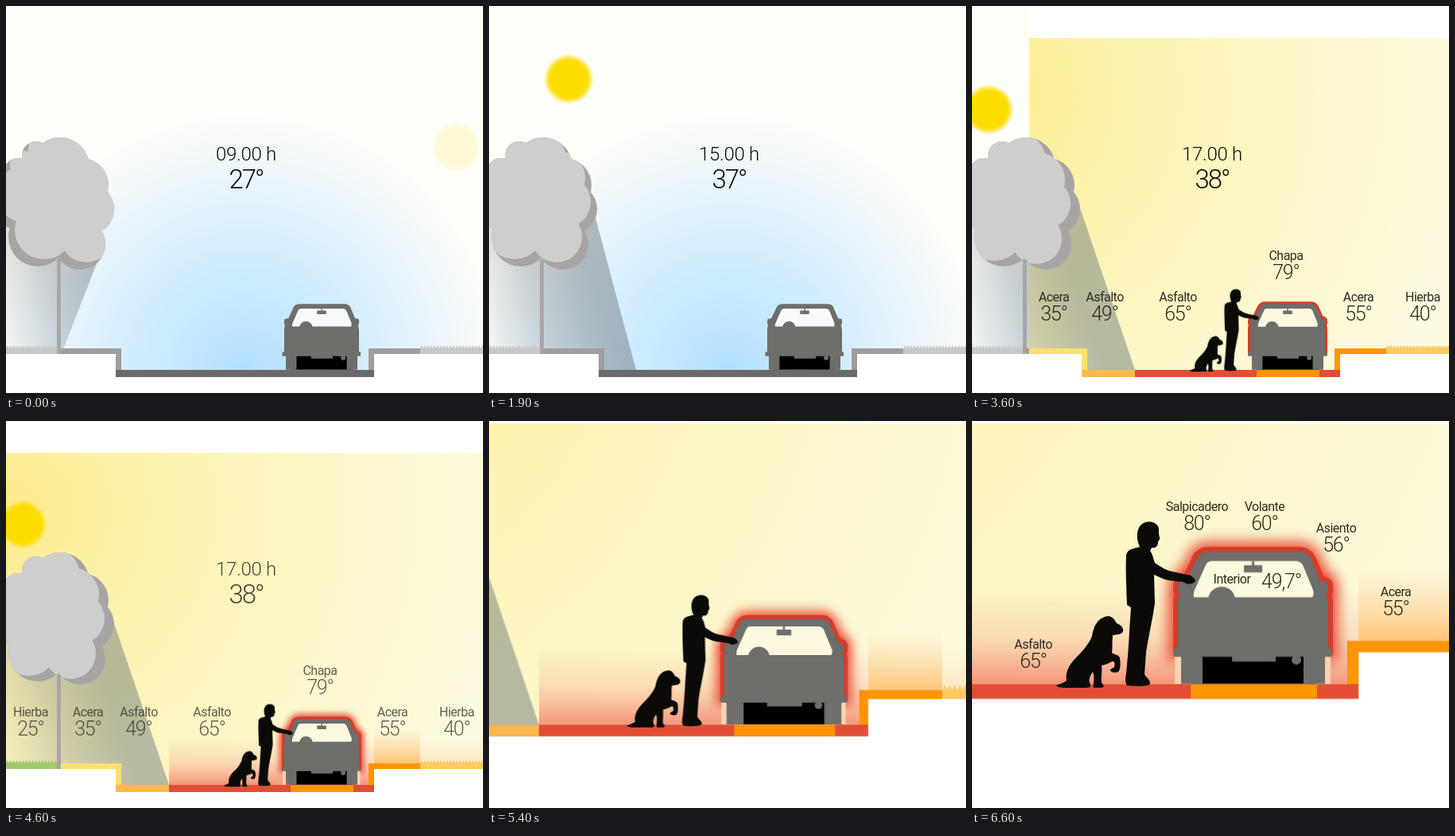
These frames come from a looping animation (600x486 px, 6800 ms). An HTML page:

```html
<!DOCTYPE html>
<html lang="es">
<head>
<meta charset="utf-8">
<title>Calor en la calle</title>
<style>
html, body { margin: 0; width: 100%; height: 100%; overflow: hidden; background: #fff; }
svg { display: block; width: 100%; height: 100%; }
text { font-family: Roboto, "Liberation Sans", sans-serif; font-weight: 300; text-anchor: middle; }
.name { font-size: 16px; letter-spacing: -.5px; font-weight: 400; }
.deg { font-size: 25px; letter-spacing: -1.2px; }
#hour { font-size: 24px; letter-spacing: -.3px; }
#temp { font-size: 33px; letter-spacing: -2px; }
.labels { fill: #2f2b20; }

/* Every animation is paused and positioned by the 10 fps clock below. */
.sun, .sunlight, .shade, .lit, .wipe, .people, .heat, .early, .scene, .late {
  animation-timing-function: linear;
  animation-fill-mode: both;
  animation-play-state: paused;
}
.sun {
  offset-path: path("M566 177A343 343 0 0 0 100 92L21 130");
  offset-rotate: 0deg;
  animation-name: travel; animation-duration: 2200ms;
}
.sunlight { animation-name: brighten; animation-duration: 400ms; }
.shade { animation-name: sweep; animation-duration: 2200ms; }
.lit { animation-name: turn; animation-duration: 2200ms; }
.wipe { animation-name: wipe; animation-duration: 1590ms; animation-delay: 2200ms; }
.people { animation-name: appear; animation-duration: 400ms; animation-delay: 2200ms; }
.heat { animation-name: appear; animation-duration: 500ms; animation-delay: 3900ms; }
.early { animation-name: vanish; animation-duration: 400ms; animation-delay: 4500ms; }
.scene { animation-name: zoom; animation-duration: 802ms; animation-delay: 4920ms; }
.late { animation-name: appear; animation-duration: 200ms; }

@keyframes travel {
  0% { offset-distance: 0%; }
  36.4% { offset-distance: 35%; }
  86.4% { offset-distance: 85.6%; }
  100% { offset-distance: 100%; }
}
@keyframes brighten { from { opacity: .15; } to { opacity: 1; } }
@keyframes sweep {
  0% { d: path("M122 303L62 457H-60V250Z"); }
  36.4% { d: path("M126 288L115 457H-60V250Z"); }
  86.4% { d: path("M134 266L185 457H-60V250Z"); }
  100% { d: path("M136 254L205 457H-60V250Z"); }
}
@keyframes turn {
  0% { transform: translate(8px, -9px); }
  36.4% { transform: translate(0, -9px); }
  86.4% { transform: translate(-8px, -9px); }
  100% { transform: translate(-12px, -7px); }
}
@keyframes wipe { from { transform: translateX(600px); } to { transform: translateX(0); } }
@keyframes appear { from { opacity: 0; } to { opacity: 1; } }
@keyframes vanish { from { opacity: 1; } to { opacity: 0; } }
@keyframes zoom {
  from { transform: translate(0, 0) scale(1); }
  to { transform: translate(-444.5px, -588px) scale(2.01); }
}
</style>
</head>
<body>
<svg viewBox="0 0 600 486">
<defs>
  <radialGradient id="cool" gradientUnits="userSpaceOnUse" cx="300" cy="457" r="325">
    <stop offset="0" stop-color="#b2dfff"/>
    <stop offset=".3" stop-color="#c8e9ff"/>
    <stop offset=".6" stop-color="#e0f2fd"/>
    <stop offset=".85" stop-color="#f3f8fa"/>
    <stop offset="1" stop-color="#fefef9"/>
  </radialGradient>
  <radialGradient id="warm" gradientUnits="userSpaceOnUse" cx="0" cy="110" r="640">
    <stop offset="0" stop-color="#fdec8c"/>
    <stop offset=".3" stop-color="#fcf3ae"/>
    <stop offset=".55" stop-color="#fcf6c3"/>
    <stop offset="1" stop-color="#fdfae2"/>
  </radialGradient>
  <radialGradient id="sunFill">
    <stop offset=".74" stop-color="#fddd00"/>
    <stop offset=".86" stop-color="#fde234" stop-opacity=".75"/>
    <stop offset="1" stop-color="#fdee90" stop-opacity="0"/>
  </radialGradient>
  <linearGradient id="shadeFill" gradientUnits="userSpaceOnUse" x1="-10" y1="400" x2="130" y2="350">
    <stop offset="0" stop-color="#6c767a" stop-opacity=".03"/>
    <stop offset=".5" stop-color="#6c767a" stop-opacity=".3"/>
    <stop offset="1" stop-color="#6c767a" stop-opacity=".48"/>
  </linearGradient>
  <linearGradient id="redHeat" x1="0" y1="1" x2="0" y2="0">
    <stop offset="0" stop-color="#f0604a" stop-opacity=".65"/>
    <stop offset=".5" stop-color="#f58a70" stop-opacity=".25"/>
    <stop offset="1" stop-color="#f9a080" stop-opacity="0"/>
  </linearGradient>
  <linearGradient id="orangeHeat" x1="0" y1="1" x2="0" y2="0">
    <stop offset="0" stop-color="#ffa030" stop-opacity=".6"/>
    <stop offset="1" stop-color="#ffc080" stop-opacity="0"/>
  </linearGradient>
  <filter id="blur" x="-30%" y="-30%" width="160%" height="160%">
    <feGaussianBlur stdDeviation="8"/>
  </filter>

  <clipPath id="warmSide"><rect class="wipe" width="600" height="486"/></clipPath>
  <g id="crown">
    <circle cx="68" cy="202" r="37"/>
    <circle cx="38" cy="188" r="18"/>
    <circle cx="15" cy="209" r="18"/>
    <circle cx="16" cy="245" r="36"/>
    <circle cx="95" cy="225" r="34"/>
    <circle cx="104" cy="255" r="32"/>
    <circle cx="93" cy="299" r="32"/>
    <circle cx="40" cy="290" r="37"/>
    <circle cx="60" cy="250" r="52"/>
  </g>
  <clipPath id="crownClip">
    <circle cx="68" cy="202" r="37"/>
    <circle cx="38" cy="188" r="18"/>
    <circle cx="15" cy="209" r="18"/>
    <circle cx="16" cy="245" r="36"/>
    <circle cx="95" cy="225" r="34"/>
    <circle cx="104" cy="255" r="32"/>
    <circle cx="93" cy="299" r="32"/>
    <circle cx="40" cy="290" r="37"/>
    <circle cx="60" cy="250" r="52"/>
  </clipPath>

  <path id="grassL"/>
  <path id="grassR"/>
  <path id="paveL" d="M65 430H145V457H138V437H65Z"/>
  <path id="paveR" d="M521 430H456V457H463V437H521Z"/>

  <!-- Car parts use the close-up scale. -->
  <g id="shell">
    <path d="M259 288V226Q259 221 262 216L283 172Q287 164 297 164H412Q422 164 426 172L444 214Q448 221 448 228V288Z"/>
    <rect x="259" y="201" width="15" height="17" rx="6"/>
    <rect x="433" y="201" width="15" height="17" rx="6"/>
  </g>
  <path id="pane" d="M279 221Q278 216 281 210L294 181Q296 176 302 176H407Q413 176 416 181L428 210Q431 216 428 221Z"/>
</defs>

<g class="scene">
  <rect width="600" height="466" fill="url(#cool)"/>
  <g clip-path="url(#warmSide)">
    <rect width="600" height="40" fill="#fff"/>
    <rect y="40" width="600" height="426" fill="url(#warm)"/>
    <g class="heat">
      <rect x="205" y="398" width="258" height="59" fill="url(#redHeat)"/>
      <rect x="463" y="385" width="58" height="45" fill="url(#orangeHeat)"/>
      <rect x="521" y="395" width="79" height="35" fill="url(#orangeHeat)" opacity=".3"/>
    </g>
  </g>

  <path class="shade" d="M136 254L205 457H-60V250Z" fill="url(#shadeFill)"/>

  <path d="M0 437H138V466H463V437H600V486H0Z" fill="#fff"/>
  <g fill="#c8c8c8"><use href="#grassL"/><use href="#grassR"/></g>
  <g fill="#9f9d9f"><use href="#paveL"/><use href="#paveR"/></g>
  <path d="M138 457H463V466H138Z" fill="#6b6a6b"/>
  <g clip-path="url(#warmSide)">
    <use href="#grassL" fill="#9fca6c"/>
    <use href="#grassR" fill="#ffca60"/>
    <use href="#paveL" fill="#fddf74"/>
    <use href="#paveR" fill="#ff9500"/>
    <path d="M138 457H205V466H138Z" fill="#fdb950"/>
    <path d="M205 457H463V466H205Z" fill="#e24e35"/>
    <path d="M358 457H437V466H358Z" fill="#ff9500"/>
  </g>

  <g class="sun"><circle class="sunlight" r="32" fill="url(#sunFill)"/></g>

  <path d="M64 318H69V437H64Z" fill="#a9a5a6"/>
  <use href="#crown" fill="#a8a4a4"/>
  <g clip-path="url(#crownClip)"><use class="lit" href="#crown" fill="#cecece"/></g>

  <g clip-path="url(#warmSide)">
    <g transform="translate(221.14 292.54) scale(.4975)">
      <g class="heat">
        <use href="#shell" fill="none" stroke="#e5402c" stroke-opacity=".85" stroke-width="26" filter="url(#blur)"/>
        <rect x="255" y="284" width="196" height="46" fill="#fbd3b4"/>
      </g>
      <use href="#shell" fill="#d93a2a" stroke="#d93a2a" stroke-width="12"/>
    </g>
  </g>
  <g transform="translate(221.14 292.54) scale(.4975)">
    <use href="#shell" fill="#6e6e6b"/>
    <use href="#pane" fill="#f7fafa"/>
  </g>
  <g clip-path="url(#warmSide)">
    <use href="#pane" transform="translate(221.14 292.54) scale(.4975)" fill="#fdf9de"/>
  </g>
  <g transform="translate(221.14 292.54) scale(.4975)">
    <path d="M275 294H433V330H275Z"/>
    <path d="M254 285H452V296H444V330H417V296H382V302H327V296H290V330H263V296H254Z
             M352 176H355V181H365V190H342V181H352ZM297 225A17 17 0 0 1 331 225Z" fill="#6e6e6b"/>
    <circle cx="408" cy="300" r="6" fill="#6e6e6b"/>

    <g class="people" fill="#0b0a09">
      <path d="M211 158C207 150 206 138 212 131C218 125 229 125 234 132C236 137 234 140 236 146C237 149 234 150 234 152
               C234 157 231 160 226 159L224 163C228 168 228 174 230 178C238 184 246 188 252 189L270 193C276 193 281 198 281 201
               C279 205 270 206 266 202C255 201 243 200 238 197L229 193L230 229C227 250 222 270 219 290L217 318
               C220 323 225 326 224 330C222 334 200 333 195 332C192 328 193 322 194 316C197 290 198 260 200 234L195 231
               C194 205 193 185 194 168C196 160 205 160 211 158Z"/>
      <path d="M172 245C178 246 180 251 182 254C187 256 191 259 190 264C189 268 183 268 177 269C176 276 177 284 176 291
               C180 294 185 293 186 298C187 305 187 311 184 315C180 317 173 315 174 312L179 309C180 304 179 301 176 302
               C171 305 167 306 163 307C164 316 162 323 163 329C167 332 166 335 162 335H153C152 330 155 322 152 315
               C148 320 146 326 149 331C150 335 146 335 140 335H118C112 335 107 334 106 332C110 330 115 329 119 326
               C117 316 122 306 131 297C140 288 147 280 151 270C153 258 158 246 172 245Z"/>
    </g>
  </g>
</g>

<rect width="600" height="3" fill="#fff"/>
<g class="early">
  <g fill="#0d0d0d">
    <text id="hour" x="302" y="194"></text>
    <text id="temp" x="302" y="229"></text>
  </g>
  <g id="street" class="labels" clip-path="url(#warmSide)"></g>
</g>
<g id="closeUp" class="labels"></g>
</svg>

<script>
const LOOP = 6800, STEP = 100, HOUR_STEP = 550;
const readings = [['09.00 h', '27°'], ['11.00 h', '29°'], ['13.00 h', '33°'], ['15.00 h', '37°'], ['17.00 h', '38°']];
const byId = id => document.getElementById(id);

function add(parent, tag, attrs, content = '') {
  const el = document.createElementNS('http://www.w3.org/2000/svg', tag);
  for (const key in attrs) el.setAttribute(key, attrs[key]);
  el.textContent = content;
  return parent.appendChild(el);
}

function label(parent, x, y, name, deg, dx = 0, dy = 24) {
  const g = add(parent, 'g', {});
  add(g, 'text', { x, y, class: 'name' }, name);
  add(g, 'text', { x: x + dx, y: y + dy, class: 'deg' }, deg);
  return g;
}

function grass(id, from, to) {
  let d = `M${from} 437V430`;
  for (let x = from; x < to; x += 4) d += `L${x + 2} 426L${x + 4} 430`;
  byId(id).setAttribute('d', d + 'V437Z');
}
grass('grassL', 0, 64);
grass('grassR', 521, 600);

[[31, 371, 'Hierba', '25°'], [103, 371, 'Acera', '35°'], [167, 371, 'Asfalto', '49°'],
 [259, 371, 'Asfalto', '65°'], [395, 319, 'Chapa', '79°'], [486, 371, 'Acera', '55°'],
 [567, 371, 'Hierba', '40°']].forEach(item => label(byId('street'), ...item));

[[77, 286, 'Asfalto', '65°'], [533, 220, 'Acera', '55°'], [283, 113, 'Salpicadero', '80°'],
 [368, 113, 'Volante', '60°'], [458, 140, 'Asiento', '56°'],
 [327, 204, 'Interior', '49,7°', 62, 6]].forEach((item, i) => {
  const g = label(byId('closeUp'), ...item);
  g.setAttribute('class', 'late');
  g.style.animationDelay = 5800 + Math.max(0, i - 1) * 100 + 'ms';
});

const animations = document.getAnimations();
const start = performance.now();

function tick() {
  const elapsed = performance.now() - start;
  const t = Math.floor(elapsed / STEP + .2) * STEP % LOOP;
  for (const a of animations) a.currentTime = t;
  const [hour, temp] = readings[Math.min(4, Math.floor(t / HOUR_STEP))];
  byId('hour').textContent = hour;
  byId('temp').textContent = temp;
  requestAnimationFrame(tick);
}
tick();
</script>
</body>
</html>
```
